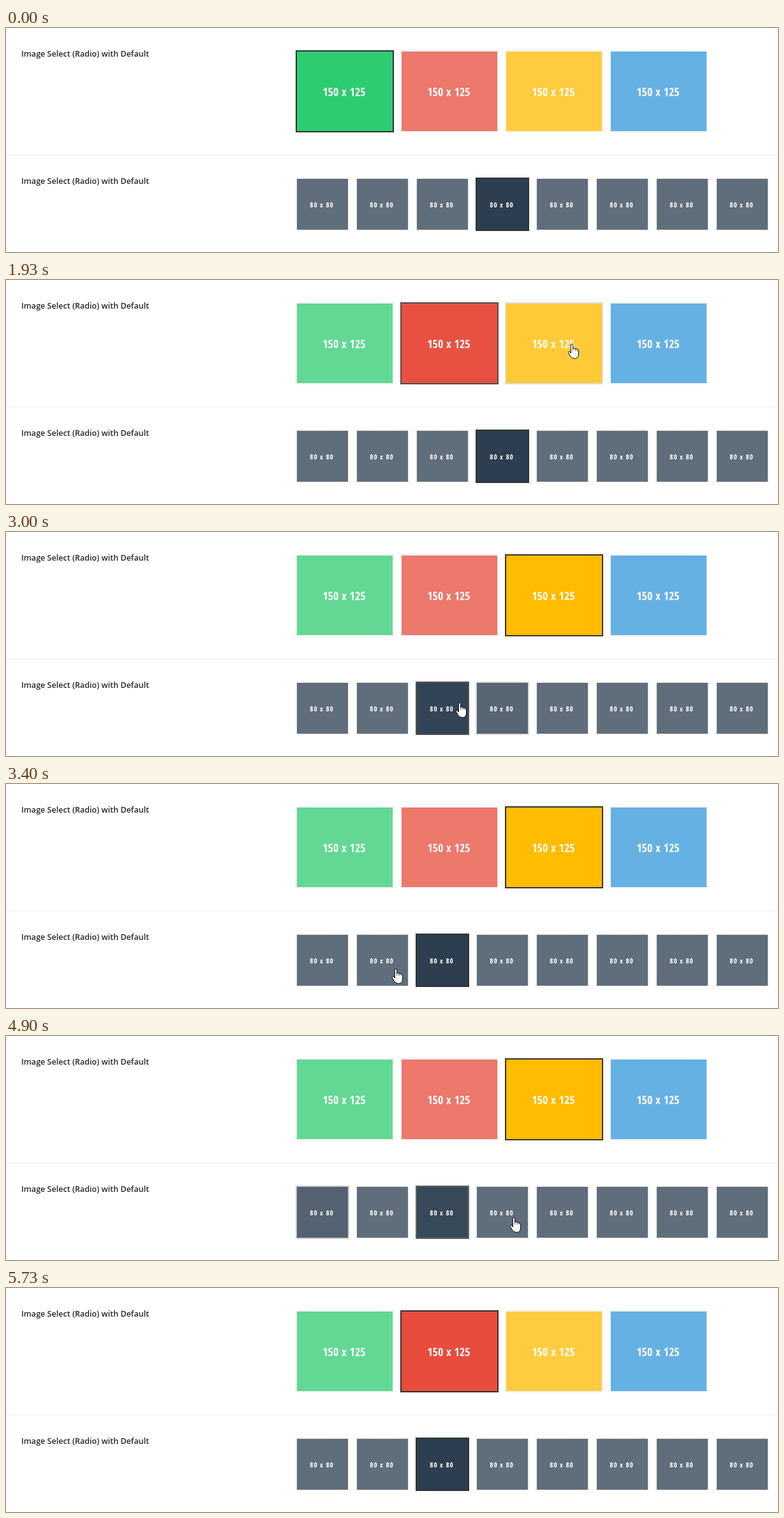
These frames come from a looping animation (1210x352 px, 6410 ms). An HTML page:

```html
<!DOCTYPE html>
<html lang="en">
<head>
<meta charset="utf-8">
<title>Image select</title>
<style>
  html, body { margin: 0; width: 100%; height: 100%; overflow: hidden; background: #fff; }
  svg { display: block; width: 1210px; height: 352px; }
  .label { font: 600 12.57px "Open Sans", "Noto Sans", sans-serif; fill: #23282d; }
  .size { font-family: "Open Sans Condensed", "Open Sans", "Noto Sans", sans-serif;
    font-weight: 700; font-stretch: 75%; fill: #fff; text-anchor: middle; }
  .cursor path { fill: #fff; stroke: #000; stroke-linejoin: round; }
</style>
</head>
<body>
<svg id="stage" viewBox="0 0 1210 352">
  <rect y="199" width="1210" height="1" fill="#eee"/>
  <text class="label" x="24" y="45">Image Select (Radio) with Default</text>
  <text class="label" x="24" y="245">Image Select (Radio) with Default</text>
  <g id="tiles"></g>
  <g id="cursor" class="cursor">
    <g id="hand">
      <path d="M-1.7 15V2.2Q-1.7 .5 0 .5T1.7 2.2V8Q2 7 3.6 7T5.2 8.8Q5.6 7.8 6.9 7.9T8.3 9.7Q8.8 8.9 9.7 9.1Q10.6 9.4 10.6 11V16Q10.6 23.5 4.5 23.5Q-.5 23.5 -2.6 19.5L-5.4 14.8Q-6 13 -4.5 12.2Q-3 12 -1.7 15Z"/>
      <path d="M1.7 8V11.5M5.2 8.8V11.5M8.3 9.7V11.5" stroke-width=".7"/>
    </g>
    <path id="arrow" d="M.5 .5V16.5L4 13.2L6.4 18.6L8.8 17.5L6.5 12.2H11.5Z"/>
  </g>
</svg>
<script>
const LOOP = 6410, FADE = 160, SHOW = 600, HIDE = 5730;
const $ = id => document.getElementById(id);
const mix = (a, b, s) => a + (b - a) * s;
const clamp = v => Math.min(1, Math.max(0, v));
const smooth = s => s * s * (3 - 2 * s);

function add(parent, tag, attrs, text = '') {
  const el = document.createElementNS('http://www.w3.org/2000/svg', tag);
  for (const k in attrs) el.setAttribute(k, attrs[k]);
  el.textContent = text;
  return parent.appendChild(el);
}

function makeRow({ y, w, h, colors, font, spacing, base, first }) {
  const tiles = colors.map((fill, i) => {
    const x = 454 + i * (w + 14);
    const g = add($('tiles'), 'g', {});
    const border = add(g, 'rect', { x, y, width: w + 4, height: h + 4 });
    add(g, 'rect', { x: x + 2, y: y + 2, width: w, height: h, fill });
    add(g, 'text', { class: 'size', x: x + 1 + w / 2, y: base,
      'font-size': font, 'letter-spacing': spacing }, `${w} x ${h}`);
    return { g, border, x, y, w: w + 4, h: h + 4 };
  });
  return { tiles, picks: [[-FADE, tiles[first]]] };
}

const rows = [
  makeRow({ y: 35, w: 150, h: 125, font: 18, spacing: 0.1, base: 107, first: 0,
    colors: ['#2ecc71', '#e74c3c', '#ffbc00', '#3498db'] }),
  makeRow({ y: 235, w: 80, h: 80, font: 11.2, spacing: 0.9, base: 282, first: 3,
    colors: Array(8).fill('#2c3e50') })
];

// pointer moves: leave, arrive, x, y, sideways bow
const entry = [652, 326];
const moves = [
  [600, 1050, 675, 100],
  [1310, 1700, 887, 100],
  [2080, 2465, 758, 266, 220],
  [2600, 2730, 719, 266],
  [2920, 3400, 611, 290],
  [3690, 3930, 478, 286],
  [4130, 4330, 684, 286],
  [4800, 5020, 940, 284],
  [5020, 5430, 690, 108],
  [5590, 5700, 429, 295]
];
const clicks = [1152, 1912, 2912, 3612, 4152, 4826, 5568];

function pointer(t) {
  let [x, y] = entry;
  for (const [leave, arrive, toX, toY, bow = 0] of moves) {
    const s = smooth(clamp((t - leave) / (arrive - leave)));
    x = mix(x, toX, s) + 2 * s * (1 - s) * bow;
    y = mix(y, toY, s);
  }
  return [x, y];
}

const hit = (b, [x, y]) => x >= b.x && x < b.x + b.w && y >= b.y && y < b.y + b.h;

// each click picks the tile under the pointer
for (const time of clicks) {
  for (const row of rows) {
    const tile = row.tiles.find(b => hit(b, pointer(time)));
    if (tile) row.picks.push([time, tile]);
  }
}

// CSS "ease": cubic-bezier(.25, .1, .25, 1)
function ease(x) {
  const curve = (s, a, b) => 3 * a * s * (1 - s) ** 2 + 3 * b * s * s * (1 - s) + s ** 3;
  let lo = 0, hi = 1;
  for (let i = 0; i < 20; i++) {
    const mid = (lo + hi) / 2;
    if (curve(mid, .25, .25) < x) lo = mid; else hi = mid;
  }
  return curve(lo, .1, 1);
}

function drawRow({ tiles, picks }, t) {
  for (const tile of tiles) {
    const on = picks.reduce((v, [start, pick]) =>
      mix(v, pick === tile ? 1 : 0, ease(clamp((t - start) / FADE))), 0);
    const c = Math.round(mix(238, 51, on));
    tile.g.setAttribute('opacity', mix(.75, 1, on));
    tile.border.setAttribute('fill', `rgb(${c},${c},${c})`);
  }
}

function drawCursor(t) {
  const at = pointer(t);
  const over = rows.some(row => row.tiles.some(b => hit(b, at)));
  $('cursor').style.display = t >= SHOW && t < HIDE ? '' : 'none';
  $('hand').style.display = over ? '' : 'none';
  $('arrow').style.display = over ? 'none' : '';
  $('cursor').setAttribute('transform', `translate(${at.map(Math.round).join(' ')})`);
}

function draw(t) {
  rows.forEach(row => drawRow(row, t));
  drawCursor(t);
}

const begin = performance.now();
function tick() {
  draw((performance.now() - begin) % LOOP);
  requestAnimationFrame(tick);
}
tick();
</script>
</body>
</html>
```
